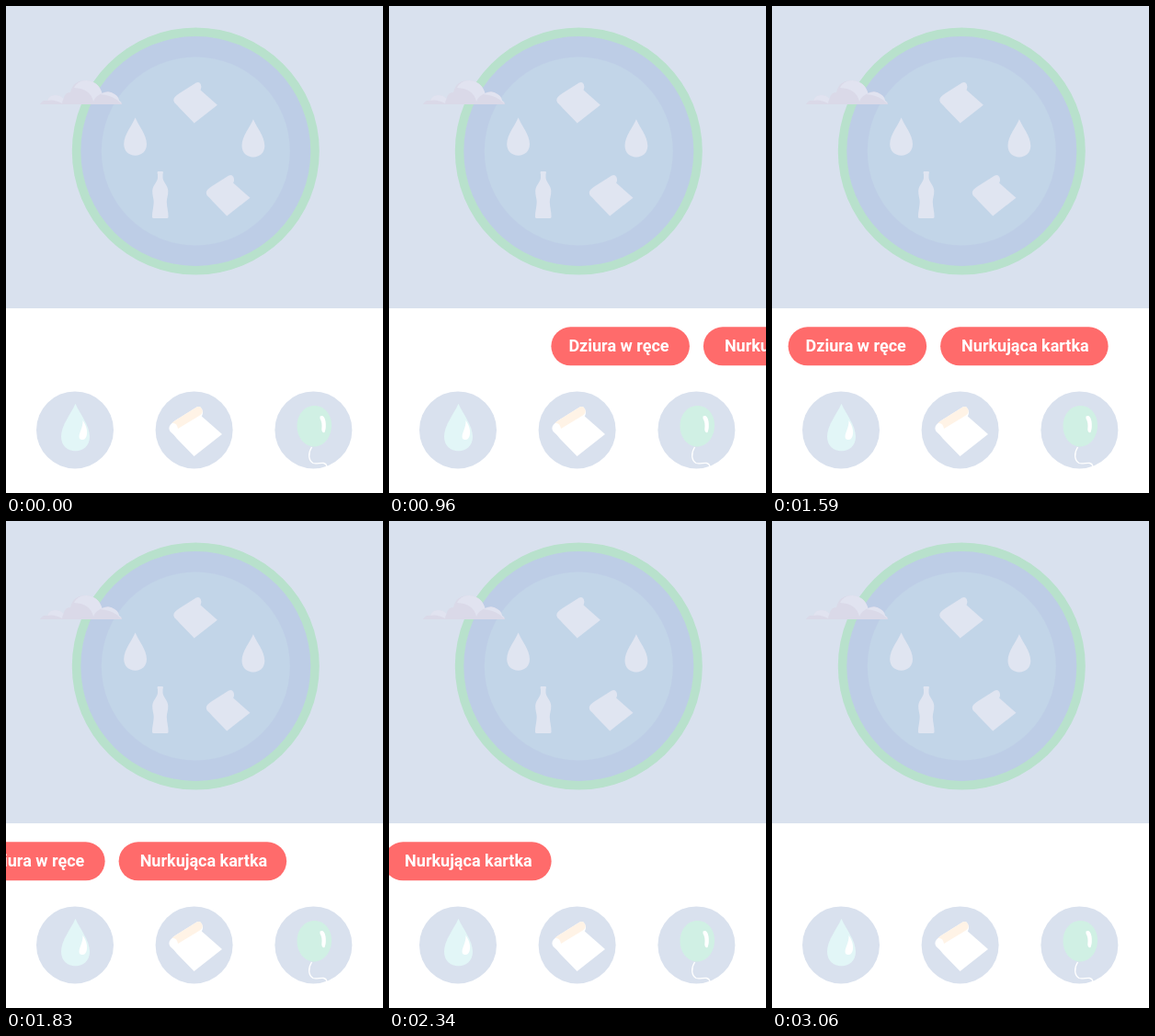
Animation, 410 px wide and 530 px high, one loop 3360 ms. Source, as an HTML page:

```html
<!DOCTYPE html>
<html lang="pl">
<head>
<meta charset="utf-8">
<title>Zabawy</title>
<style>
  html, body { margin: 0; width: 100%; height: 100%; overflow: hidden; background: #fff; }
  svg { display: block; }
  text { font: 600 18px Roboto, "Open Sans", sans-serif; fill: #fff; }
</style>
</head>
<body>
<svg width="410" height="530" viewBox="0 0 410 530">
  <defs>
    <path id="drop" d="M0 0C4 10 15.5 23 15.5 36C15.5 46 8.5 51.5 0 51.5S-15.5 46-15.5 36C-15.5 23-4 10 0 0Z"/>
    <path id="sheet" d="M207 436.800Q211 434.800 213 438.500Q215 442.500 212.800 446.500L235 466L204.500 490L186 471Q182 466 178.500 463Q176 459 179 455.500Q181 453 185 450.500Z"/>
  </defs>

  <!-- Scene -->
  <rect width="410" height="329" fill="#d9e1ee"/>
  <g>
    <circle cx="206.300" cy="158" r="134.500" fill="#b8e1cc"/>
    <circle cx="206.300" cy="158" r="125" fill="#bdcde6"/>
    <circle cx="206.300" cy="158" r="102.500" fill="#c2d5e8"/>
  </g>
  <g fill="#e0e5f1">
    <use href="#drop" transform="translate(140.600 121.500) scale(.8)"/>
    <use href="#drop" transform="translate(268.900 123.200) scale(.8)"/>
    <use href="#sheet" transform="translate(35.800 -277.200) scale(.826)"/>
    <use href="#sheet" transform="translate(71.300 -176.200) scale(.826)"/>
    <path d="M165 180H170.500Q171.500 181.500 170.500 183V187C171 192 176 195 176.300 201C176.500 206 174.800 209 174.800 213C174.800 219 177 225 176.500 230Q176.300 231 175 231H160.500Q159.200 231 159 230C158.500 225 160.700 219 160.700 213C160.700 209 159 206 159.200 201C159.500 195 164.500 192 165 187V183Q164 181.500 165 180Z"/>
  </g>

  <!-- Cloud -->
  <g fill="#dad9e8">
    <path d="M37 107Q40 102 45 103Q47 97 53 97Q60 97 62.500 101Q64 94 70 94Q73 81 87 81Q101 82 104 95Q112 91 118 96Q122 98 123 103Q126 104 126 107Z"/>
    <g fill="#e1e3f0">
      <path d="M45 103Q47 97 53 97Q60 97 62.500 101Q61 104 61 106Q52 101 45 103Z"/>
      <path d="M74 89Q78 81 87 81Q101 82 104.500 95Q97 98 95 104Q92 90 74 89Z"/>
      <path d="M102 96Q112 91 118 96Q122 98 123 103Q125 104 125 106Q117 97 102 96Z"/>
    </g>
  </g>

  <!-- Sliding labels -->
  <g id="strip">
    <g fill="#ff6b6b">
      <rect y="349.300" width="150.500" height="42" rx="21"/>
      <rect x="165.500" y="349.300" width="182.500" height="42" rx="21"/>
    </g>
    <text x="19" y="376">Dziura w ręce</text>
    <text x="188.500" y="376">Nurkująca kartka</text>
  </g>

  <!-- Round buttons -->
  <g fill="#d9e1ee">
    <circle cx="75" cy="461.400" r="42"/>
    <circle cx="204.600" cy="461.400" r="42"/>
    <circle cx="334.400" cy="461.400" r="42"/>
  </g>
  <use href="#drop" x="75.500" y="432.800" fill="#e2f6f7"/>
  <path d="M83.500 451C88 457 90 466 86 471Q83 473 80 471C78 465 84 460 83.500 451Z" fill="#fff"/>
  <use href="#sheet" fill="#fff"/>
  <path d="M207 436.800Q211 434.800 213 438.500Q215 443 210.500 445.800L187 460Q186 453 180.500 454Q182 452 185 450.500Z" fill="#fff3e6"/>
  <path d="M335.500 435C346 435 354 444 354 456.500C354 470 345 479.500 335 479.500S316.500 470 316.500 457C316.500 444 325 435 335.500 435Z" fill="#d0f0e4"/>
  <path d="M341.500 446.500Q346 444.500 347.500 452Q348.500 459 346.500 464Q344 465 343.300 461Q344.200 453 341.500 449Z" fill="#fff"/>
  <path d="M332.500 480C328 487 329 495 334 497.500C339 499.500 347 494 349 501V504" fill="none" stroke="#fff" stroke-width="1.300"/>
</svg>
<script>
  const LOOP = 3360, STEP = 30, START = 418.300, SPEED = .252;
  const strip = document.getElementById("strip");

  function draw() {
    const time = performance.now() % LOOP;
    const tick = Math.floor(time / STEP) * STEP;
    strip.setAttribute("transform", `translate(${(START - SPEED * tick).toFixed(2)} 0)`);
    requestAnimationFrame(draw);
  }
  draw();
</script>
</body>
</html>
```
